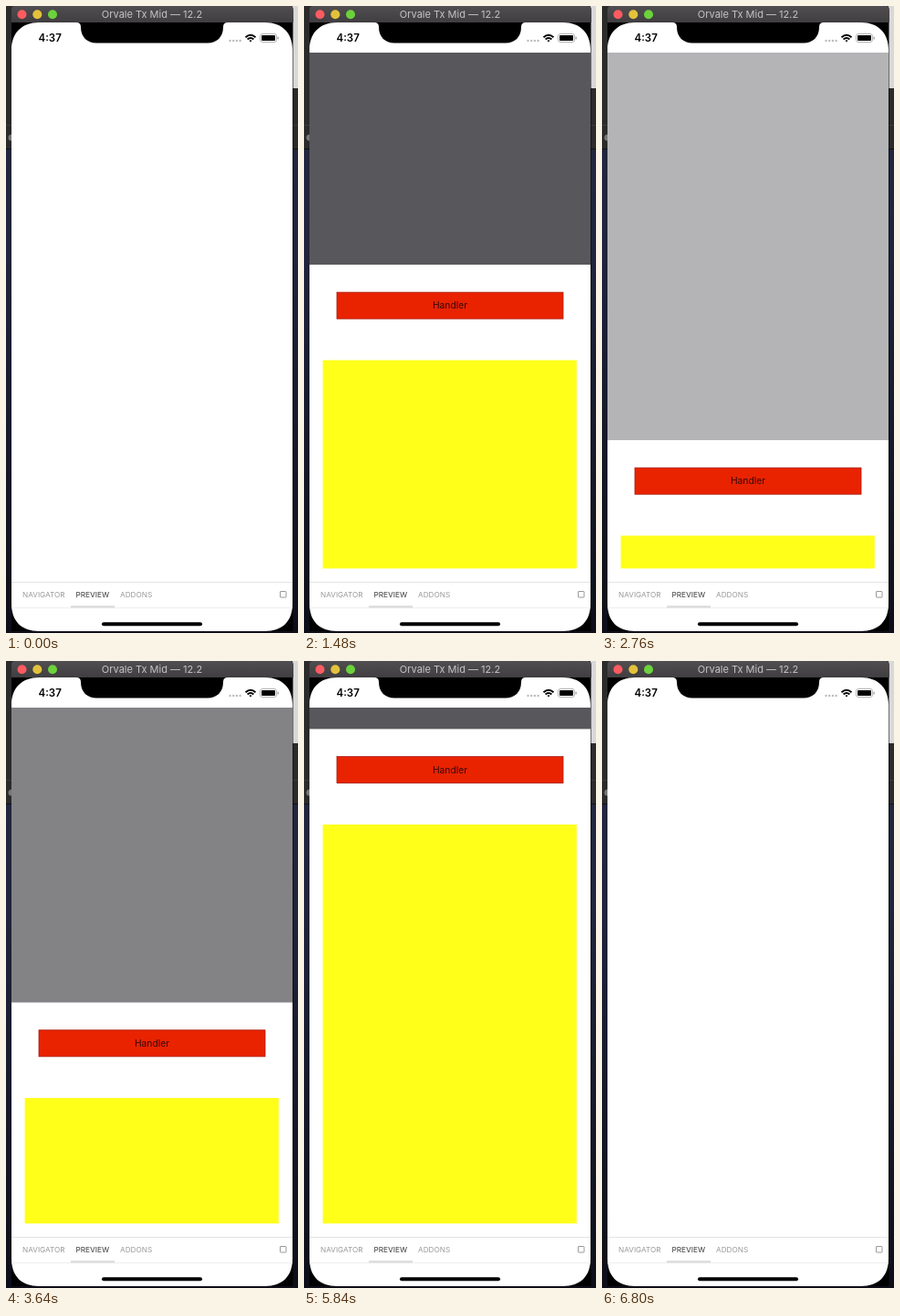
Recreate the animation shown at these times as an HTML page. Size 320 by 686 pixels, loop 6960 ms.

```html
<!DOCTYPE html>
<html lang="en">
<head>
<meta charset="utf-8">
<title>Bottom sheet</title>
<style>
  html, body { margin: 0; width: 100%; height: 100%; overflow: hidden; background: #17192a; }
  svg { display: block; width: 100%; height: 100%; }
  text { font-family: Inter, Roboto, sans-serif; }
  .tab { font-size: 8.2px; fill: #999; }
</style>
</head>
<body>
<svg viewBox="0 0 320 686">
  <defs>
    <linearGradient id="desk" x2="0" y2="1">
      <stop stop-color="#262a40"/>
      <stop offset=".4" stop-color="#20243c"/>
      <stop offset="1" stop-color="#0d0e18"/>
    </linearGradient>
    <linearGradient id="bar" x2="0" y2="1">
      <stop stop-color="#504e50"/>
      <stop offset="1" stop-color="#403e40"/>
    </linearGradient>
    <clipPath id="content"><rect x="6" y="51" width="308" height="579"/></clipPath>
  </defs>

  <!-- desktop behind the window -->
  <rect width="320" height="686" fill="url(#desk)"/>
  <rect width="320" height="157" fill="#2b2b2c"/>
  <rect y="130" width="320" height="1" fill="#3a3a3a"/>
  <rect y="156" width="320" height="1" fill="#111"/>
  <circle cx="6" cy="144" r="3.5" fill="#777"/>
  <rect x="314" width="6" height="90" fill="#d8d8d8"/>

  <!-- window and phone -->
  <rect x="6" y="10" width="308.5" height="674" fill="#000"/>
  <path d="M6 18V4q0-4 4-4H311q4 0 4 4V18Z" fill="url(#bar)"/>
  <circle cx="17.5" cy="9.3" r="5" fill="#fc5b62"/>
  <circle cx="34.3" cy="9.3" r="5" fill="#e2c23c"/>
  <circle cx="51" cy="9.3" r="5" fill="#6bd23c"/>
  <text x="160" y="13.2" font-size="11" fill="#c6c4c6" text-anchor="middle">Orvale Tx Mid — 12.2</text>
  <path fill="#fff" d="M36 18H77q5 0 5 5c0 11 7 17.5 17 17.5H221c10 0 17-6.5 17-17.5q0-5 5-5H284
    C303 18 314 30 314 48V654C314 673 303 684 284 684H36C17 684 6 673 6 654V48C6 30 17 18 36 18Z"/>

  <!-- status bar -->
  <text x="35.5" y="39.3" font-size="11.5" font-weight="600">4:37</text>
  <g fill="#bbb">
    <circle cx="245.5" cy="38" r="1.2"/><circle cx="249.2" cy="38" r="1.2"/>
    <circle cx="252.9" cy="38" r="1.2"/><circle cx="256.6" cy="38" r="1.2"/>
  </g>
  <g fill="none" stroke="#000" stroke-width="1.9">
    <path d="M262.5 34.2q5.5-5 11 0M264.6 36.5q3.4-3 6.8 0"/>
    <path d="M266.5 37.8q1.5-1.2 3 0L268 39.5Z" fill="#000" stroke="none"/>
  </g>
  <rect x="278.5" y="30.5" width="18" height="9" rx="2.5" fill="none" stroke="#b4b4b4"/>
  <rect x="280" y="32" width="15" height="6" rx="1"/>
  <rect x="297.5" y="33.5" width="1.2" height="3" rx=".6" fill="#999"/>

  <!-- sheet -->
  <g clip-path="url(#content)">
    <rect id="shade" x="6" y="51" width="308" height="579" fill="#58575c"/>
    <g id="sheet">
      <rect x="6" width="308" height="600" fill="#fff"/>
      <rect x="36" y="30.2" width="248" height="29" fill="#e92300" stroke="#a81c10" stroke-width=".8"/>
      <text x="160" y="48.3" font-size="10.3" fill="#3b0808" text-anchor="middle">Handler</text>
      <rect id="body" x="20.6" y="104.5" width="278.2" fill="#ffff1a"/>
    </g>
  </g>

  <!-- tab bar -->
  <rect x="6" y="630" width="308" height="1" fill="#e4e4e4"/>
  <rect x="6" y="658" width="308" height="1" fill="#eee"/>
  <rect x="71" y="656" width="48" height="2.5" fill="#dedede"/>
  <text class="tab" x="18" y="647">NAVIGATOR</text>
  <text class="tab" x="76.5" y="647" style="fill:#555;font-weight:500">PREVIEW</text>
  <text class="tab" x="125" y="647">ADDONS</text>
  <rect x="300.5" y="640.5" width="6.5" height="6.5" rx=".5" fill="none" stroke="#999"/>
  <rect x="105" y="674.2" width="110" height="4" rx="2"/>
</svg>
<script>
const LOOP = 6960, CLOSED = 630, MIDDLE = 283, LOW = 475, FULL = 51;
const BODY_OFFSET = 104.5, CONTENT_END = 615.4;
// start, end (ms) and the sheet's top edge at the end of each move
const moves = [
  [470, 900, MIDDLE],
  [1600, 2520, LOW],
  [3392, 3872, MIDDLE],
  [4480, 5012, FULL],
  [5749, 6509, CLOSED],
];
const [shade, sheet, body] = ['shade', 'sheet', 'body'].map(id => document.getElementById(id));
const clamp = v => Math.min(1, Math.max(0, v));
const smooth = v => v * v * (3 - 2 * v);

function sheetTop(time) {
  return moves.reduce((top, [start, end, goal]) =>
    top + (goal - top) * smooth(clamp((time - start) / (end - start))), CLOSED);
}

function draw(now) {
  const top = sheetTop(now % LOOP);
  sheet.setAttribute('transform', `translate(0 ${top})`);
  body.setAttribute('height', Math.max(0, CONTENT_END - top - BODY_OFFSET));
  shade.setAttribute('opacity', clamp((CLOSED - top) / (CLOSED - MIDDLE)));
  requestAnimationFrame(draw);
}
draw(0);
</script>
</body>
</html>
```
